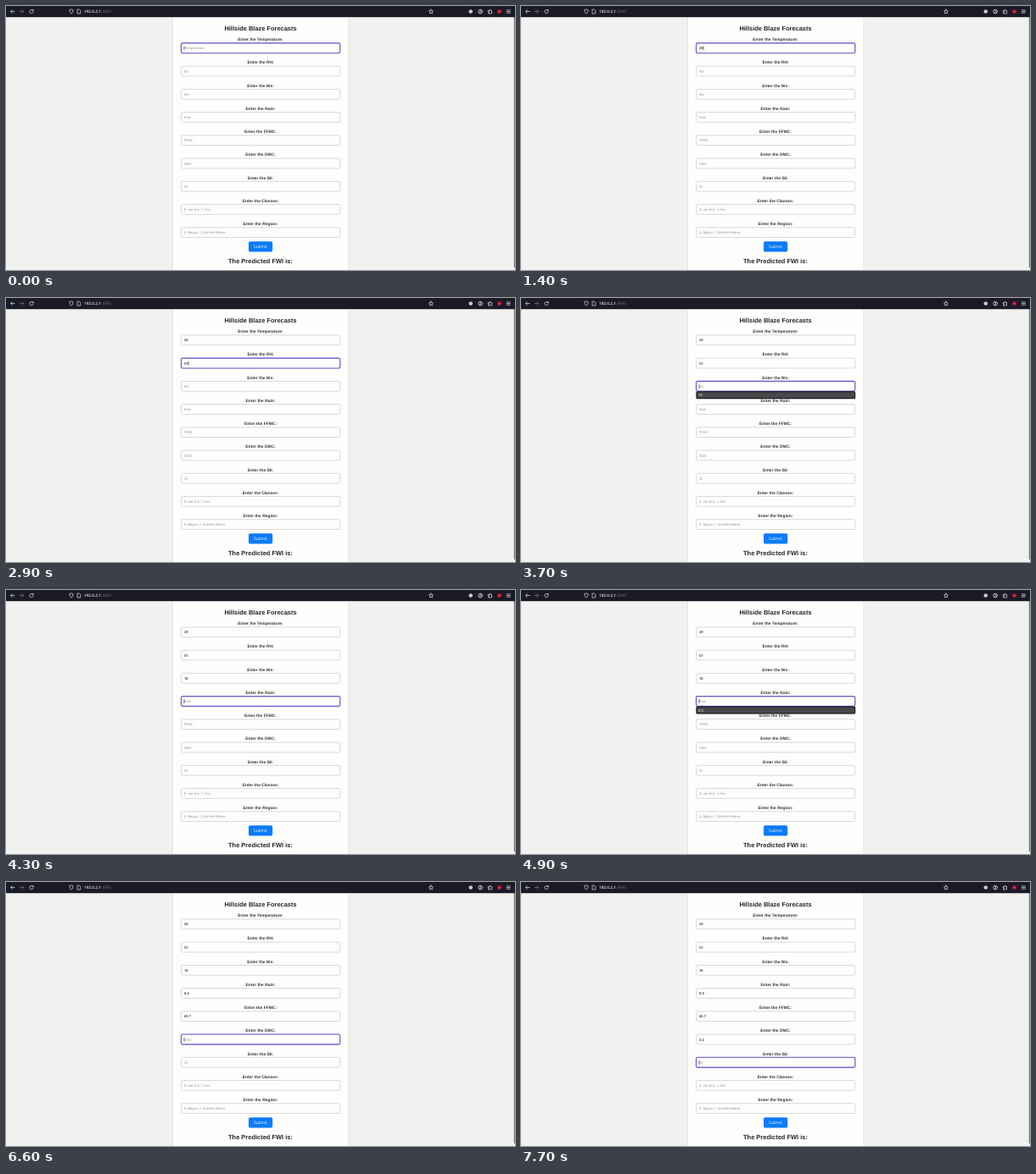
An HTML page for the animation above (8 s loop, 600 by 312 pixels).

```html
<!DOCTYPE html>
<html lang="en">
<head>
<meta charset="utf-8">
<title>Hillside Blaze Forecasts</title>
<style>
  html, body { margin: 0; width: 100%; height: 100%; overflow: hidden; background: #f1f1ef; }
  svg { display: block; width: 600px; height: 312px; text-rendering: geometricPrecision; }
  text { font-family: "Open Sans", "Noto Sans", sans-serif; }
  .bold { font-family: "Liberation Sans", Arial, sans-serif; font-weight: 700; text-anchor: middle; fill: #262626; }
  .label { font-size: 4.9px; fill: #363636; }
  .entry { font-size: 4px; }
  .option { font-size: 4.5px; fill: #f2f2f2; }
  .icon { fill: none; stroke: #d6d6dc; stroke-width: .75; stroke-linecap: round; stroke-linejoin: round; }
</style>
</head>
<body>
<svg id="stage" viewBox="0 0 600 312">
  <rect width="600" height="312" fill="#f1f1ef"/>
  <rect x="196" y="10" width="208.5" height="304" fill="#e3e3e1"/>
  <rect x="197" y="10" width="206.5" height="304" fill="#fefefc"/>
  <rect x="598.8" y="13" width="1.2" height="296" fill="#77777b"/>

  <rect width="600" height="13.2" fill="#1b1a27"/>
  <g class="icon">
    <path d="M10 6.5H5.4M7.4 4.5L5.4 6.5L7.4 8.5"/>
    <path d="M16.2 6.5H20.8M18.8 4.5L20.8 6.5L18.8 8.5" stroke="#77767f"/>
    <path d="M31.8 5.2A2.2 2.2 0 1 0 32.2 7M32.2 4.2V5.6H30.8"/>
    <path d="M77 4L79.2 4.8Q79.2 8 77 9.2Q74.8 8 74.8 4.8Z"/>
    <path d="M84.4 4H86.5L87.8 5.3V9H84.4Z"/>
    <path d="M501 3.9L501.8 5.6L503.5 5.8L502.2 7.1L502.6 8.9L501 8L499.4 8.9L499.8 7.1L498.5 5.8L500.2 5.6Z"/>
    <circle cx="559.2" cy="6.5" r="2.4"/>
    <circle cx="559.2" cy="5.8" r=".6"/>
    <path d="M557.8 8.2Q559.2 7 560.6 8.2"/>
    <path d="M568.6 5.4H570V4.4H571.2V5.4H572.6V8.9H568.6V7.8H569.5V6.6H568.6Z"/>
    <path d="M590.2 4.8H594.4M590.2 6.5H594.4M590.2 8.2H594.4"/>
  </g>
  <circle cx="547.8" cy="6.5" r="2.3" fill="#c9c9cf"/>
  <circle cx="581.6" cy="6.5" r="2.3" fill="#d3203a"/>
  <text x="92" y="8.2" font-size="4.7" font-weight="600" fill="#ececf0">192.0.2.1<tspan font-weight="400" fill="#77767f">:4300</tspan></text>

  <text class="bold" x="300" y="28.5" font-size="7.45">Hillside Blaze Forecasts</text>
  <g id="form"></g>
  <rect x="286" y="278.3" width="28.2" height="12.1" rx="1.7" fill="#0a7cfa"/>
  <text x="300" y="286.1" font-size="4.8" text-anchor="middle" fill="#fff">Submit</text>
  <text class="bold" x="300" y="303.6" font-size="7.47">The Predicted FWI is:</text>
  <g id="popup">
    <rect x="206.4" width="187.8" height="9" rx="1.6" fill="#0c0c0e"/>
    <rect id="row" x="207.4" y="1" width="185.8" height="7" rx=".8"/>
    <text id="option" class="option" x="208.7" y="6.1"></text>
  </g>
  <rect id="caret" width=".6" height="5" fill="#222"/>
</svg>
<script>
const LOOP = 8000, TOP = 43.8, PITCH = 27.23, TEXT_X = 210;

// label, placeholder, value, times: focus, open, highlight, pick
const fields = [
  ["Temperature", "Temperature", "29", 0, 800, 1100, 1300],
  ["RH", "RH", "57", 2100, 2200, 2300, 2600],
  ["Ws", "Ws", "18", 3200, 3500, 3700, 3900],
  ["Rain", "Rain", "0.0", 4200, 4700, 4900, 5000],
  ["FFMC", "FFMC", "65.7", 5500, 5800, 6000, 6200],
  ["DMC", "DMC", "3.4", 6600, 6900, 7100, 7300],
  ["ISI", "ISI", "", 7700],
  ["Classes", "0: not fire, 1: fire", ""],
  ["Region", "0: Bejaia, 1: Sidi-Bel Abbes", ""]
].map(([label, hint, value, focus = Infinity, open = Infinity, mark = Infinity, pick = Infinity], i) =>
  ({ label, hint, value, focus, open, mark, pick, y: TOP + i * PITCH }));

const $ = id => document.getElementById(id);
const form = $("form"), popup = $("popup"), row = $("row"), option = $("option"), caret = $("caret");

function set(node, attrs) {
  for (const key in attrs) node.setAttribute(key, attrs[key]);
  return node;
}

function add(tag, attrs, text = "") {
  const node = set(document.createElementNS("http://www.w3.org/2000/svg", tag), attrs);
  node.textContent = text;
  return form.appendChild(node);
}

for (const f of fields) {
  add("text", { class: "bold label", x: 300, y: f.y - 2.6 }, `Enter the ${f.label}:`);
  f.glow = add("rect", { x: 205.9, y: f.y - .5, width: 188.5, height: 13, rx: 2.3, fill: "#d5cdf5" });
  f.box = add("rect", { x: 206.5, y: f.y + .1, width: 187.3, height: 11.8, rx: 1.8, fill: "#fefefd" });
  f.text = add("text", { class: "entry", x: TEXT_X, y: f.y + 7.6 });
}

function draw(t) {
  const active = fields.filter(f => t >= f.focus).pop();

  for (const f of fields) {
    const focused = f === active, filled = t >= f.pick;
    set(f.glow, { opacity: focused ? 1 : 0 });
    set(f.box, { stroke: focused ? "#6a50cf" : "#cbcbcb", "stroke-width": focused ? 1.1 : .75 });
    f.text.textContent = filled ? f.value : f.hint;
    set(f.text, { fill: filled ? "#1e1e1e" : "#8b8b8b", "font-weight": filled ? 600 : 400 });
  }

  const { y, open, mark, pick, value, text } = active;
  const shown = t < open || t >= pick + 100 ? 0 : t < pick ? 1 : .4;
  set(popup, { transform: `translate(0 ${y + 12.1})`, opacity: shown });
  set(row, { fill: t >= mark ? "#48474b" : "#232327" });
  option.textContent = value;

  const end = t >= pick ? text.getComputedTextLength() + .2 : -.3;
  const blinkOff = t >= 200 && t < 800;
  set(caret, { x: TEXT_X + end, y: y + 3.6, opacity: blinkOff ? 0 : 1 });
}

const start = performance.now();
function tick() {
  draw((performance.now() - start) % LOOP);
  requestAnimationFrame(tick);
}
tick();
</script>
</body>
</html>
```
